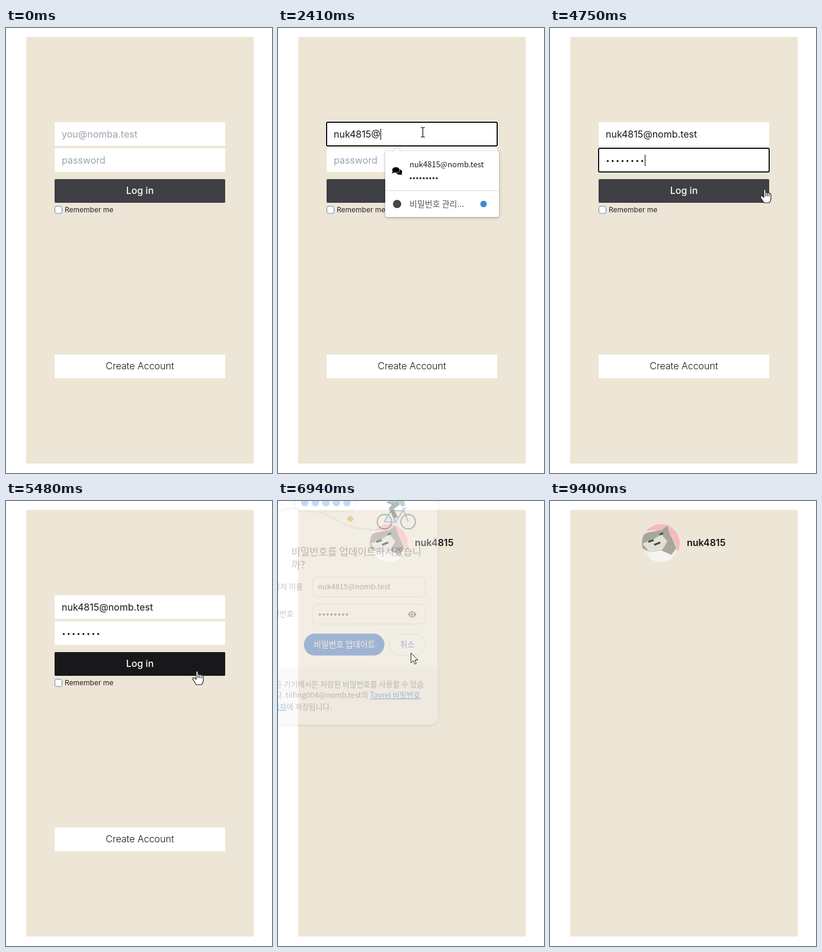
These frames come from a looping animation (449x751 px, 9.46 s). An HTML page:

```html
<!DOCTYPE html>
<html lang="en">
<head>
<meta charset="utf-8">
<title>Login flow</title>
<style>
html, body { margin: 0; width: 100%; height: 100%; overflow: hidden; background: #fff; }
svg { display: block; width: 449px; height: 751px; }
text { font: 400 16px Inter, sans-serif; fill: #18181b; white-space: pre; }
.mid { text-anchor: middle; }
.end { text-anchor: end; }
.hint { fill: #9ca3af; }
.ko text { font: 400 13px "Noto Sans CJK KR", "Noto Sans CJK", "Noto Sans CJK JP", sans-serif; fill: #55565a; }
.ko .title { font-size: 17.2px; }
.ko .btn { font-size: 14px; font-weight: 500; }
.link { fill: #0b57d0; text-decoration: underline; }
.dots { fill: none; stroke-linecap: round; }
#bubble { filter: drop-shadow(0 1px 2px rgba(0, 0, 0, .3)); }
#menu { filter: drop-shadow(0 1px 2px rgba(0, 0, 0, .35)); }
</style>
</head>
<body>
<svg viewBox="0 0 449 751">
  <rect x="34" y="15" width="384" height="720" fill="#ede6d6"/>

  <g id="login">
    <rect x="82" y="159" width="288" height="40" rx="2" fill="#fff"/>
    <rect x="82" y="203" width="288" height="40" rx="2" fill="#fff"/>
    <g id="ring" fill="#fff">
      <rect x="80" y="157" width="292" height="44" rx="4"/>
      <rect x="82" y="159" width="288" height="40" rx="2" stroke="#101010" stroke-width="2"/>
    </g>
    <text id="mailHint" class="hint" x="94" y="185">you@nomba.test</text>
    <text id="mail" x="94" y="185"></text>
    <text id="passHint" class="hint" x="94" y="229">password</text>
    <path id="pass" class="dots" stroke="#18181b" stroke-width="3.4" stroke-dasharray="0 8.3"/>
    <rect id="caret" width="1" height="19" fill="#000"/>
    <rect x="82" y="255" width="288" height="40" rx="2" fill="#3f3f46"/>
    <rect id="hover" x="82" y="255" width="288" height="40" rx="2" fill="#18181b"/>
    <text class="mid" x="226" y="280" style="fill:#fff;font-weight:500">Log in</text>
    <rect x="82.5" y="301" width="12" height="12" rx="2.5" fill="#fff" stroke="#5f89ab"/>
    <text x="99" y="311" style="font-size:12px;fill:#2b2027">Remember me</text>
    <rect x="82" y="551" width="288" height="40" fill="#fff"/>
    <text class="mid" x="226" y="576" style="font-weight:300">Create Account</text>

    <g id="menu" class="ko">
      <rect x="181" y="208" width="192" height="111" rx="4" fill="#fff"/>
      <path d="M195 208l6-6 6 6z" fill="#fff"/>
      <path d="M181 274.5h192" stroke="#d3dcea"/>
      <ellipse cx="204.500" cy="243" rx="5" ry="4.500"/>
      <ellipse cx="199" cy="239.500" rx="6.500" ry="5" stroke="#fff" stroke-width=".8"/>
      <path d="M194 241l-2 4.500 5-2zM208 244l1.500 4-5-1z"/>
      <text x="222" y="235" style="fill:#1f1f1f">nuk4815@nomb.test</text>
      <path class="dots" d="M224 253.500h45" stroke="#33282c" stroke-width="3.4" stroke-dasharray="0 5.5"/>
      <circle cx="201" cy="297" r="7" fill="#4c4146"/>
      <text x="222" y="302" style="font-size:14px">비밀번호 관리...</text>
      <circle cx="347" cy="297" r="5.500" fill="#3d87d6"/>
    </g>
  </g>

  <g id="home">
    <clipPath id="round"><circle cx="187" cy="71" r="32"/></clipPath>
    <g clip-path="url(#round)">
      <rect x="155" y="39" width="64" height="64" fill="#efece4"/>
      <path d="M165 39h54v50q-4-2-6-12-5-20-20-25-14-5-30-1z" fill="#f6b9c1"/>
      <path d="M155 58l10-5 24-4 9-8 4 15q7 10 11 24l-14 18-44-18z" fill="#a9a69a"/>
      <path d="M156 72l20-8 12-8 10 12-8 14-22 4z" fill="#e3e0d7"/>
      <path d="M165 87l22-4 18 8v12h-32z" fill="#f6f4ee"/>
      <path d="M166 69l9-3M185 57l6-3M176 74l10-4" stroke="#4a473f" stroke-width="3"/>
    </g>
    <text x="231" y="76" style="font-weight:600">nuk4815</text>

    <g id="bubble" class="ko">
      <rect x="-40" y="-53" width="313" height="435" rx="12" fill="#fff"/>
      <path d="M-40 283h313v87a12 12 0 0 1-12 12H-40z" fill="#f2f2f2"/>
      <path d="M-5 16C20 2 66 10 90 25s45 20 75 21" fill="none" stroke="#e1e3e6" stroke-width="3"/>
      <rect x="27" y="-25" width="104" height="40" rx="14" fill="#fff" stroke="#dfe2e6" stroke-width="2"/>
      <path class="dots" d="M43.500-1h74" stroke="#5a93ee" stroke-width="13" stroke-dasharray="0 18.2"/>
      <rect x="117.500" y="22.500" width="9" height="9" rx="1.500" fill="#dba63a" transform="rotate(38 122 27)"/>
      <g fill="none" stroke="#355a78" stroke-width="2">
        <circle cx="181" cy="32" r="12.500"/><circle cx="222" cy="32" r="12.500"/>
        <path d="M181 32l11-19h21l-13 20zM192 13l8 20M222 32l-9-23h6" stroke="#3f7fd9"/>
      </g>
      <path d="M183-2l23-4 1 9-10 7 7 14-6 2-10-17 6-6z" fill="#20364a"/>
      <path d="M190-14q16-4 24 6l3 12-6 2-5-8-14 2z" fill="#2f8a57"/>
      <text class="title" x="20" y="90">비밀번호를 업데이트하시겠습니</text>
      <text class="title" x="20" y="113">까?</text>
      <text class="end" x="40" y="149">사용자 이름</text>
      <text class="end" x="24" y="196">비밀번호</text>
      <g fill="none" stroke="#c9ccd0">
        <rect x="56.500" y="127.500" width="195" height="34" rx="8"/>
        <rect x="56.500" y="174.500" width="195" height="34" rx="8"/>
        <rect x="189.500" y="225.500" width="62" height="37" rx="18.500" stroke="#b3cdf5"/>
      </g>
      <text x="66" y="149">nuk4815@nomb.test</text>
      <path class="dots" d="M69.500 192h47.500" stroke="#474747" stroke-width="4" stroke-dasharray="0 6.7"/>
      <path d="M221.500 192q7.500-11 15 0-7.500 11-15 0z" fill="#474747"/>
      <circle cx="229" cy="192" r="2.700" fill="#474747" stroke="#fff" stroke-width="1.400"/>
      <rect x="42" y="225" width="139" height="38" rx="19" fill="#0b57d0"/>
      <text class="btn mid" x="112" y="249" style="fill:#fff">비밀번호 업데이트</text>
      <text class="btn mid" x="220.500" y="249" style="fill:#0b57d0">취소</text>
      <text class="end" x="249" y="317">모든 기기에서든 저장된 비밀번호를 사용할 수 있습</text>
      <text class="end" x="243" y="336">니다. tilfing004@nomb.test의 <tspan class="link">Tavrel 비밀번호</tspan></text>
      <text class="end" x="90" y="356"><tspan class="link">관리자</tspan>에 저장됩니다.</text>
    </g>
  </g>

  <circle id="click" r="12" fill="#ff0" fill-opacity=".47"/>
  <g id="cursor">
    <path id="arrow" transform="translate(-.5 -.5)" d="M0 0v16.500l3.900-3.600 2.600 5.900 2.500-1.100-2.600-5.700h5.100z" fill="#fff" stroke="#222"/>
    <g id="beam" fill="none" stroke="#000" stroke-width="1.100">
      <path id="bar" d="M-3-8h2.500l1 1 1-1H4M.5-7V7M-3 8h2.500l1-1 1 1H4" stroke="#fff" stroke-width="2.600"/>
      <path d="M-3-8h2.500l1 1 1-1H4M.5-7V7M-3 8h2.500l1-1 1 1H4"/>
    </g>
    <path id="hand" d="M-2 14V2q0-2 1.500-2T1 2v5q0-1.500 1.500-1.500T4 7.500q0-1.500 1.500-1.500T7 8q0-1 1.300-1T10 9v7q0 4-3 7H-2q-2-4-5-8-1.500-2.500 0-3.500t3 1zM1 7v5M4 8v4M7 9v3" fill="#fff" stroke="#222" stroke-width="1.200" stroke-linejoin="round"/>
  </g>
</svg>
<script>
const LOOP = 9460, TICK = 66.62, CLICK = 140;
const EMAIL = 'nuk4815@nomb.test';
const FOCUS = 680, TAB = 3410, SUBMIT = 5340, HOME = 5810, CANCEL = 6800;
const clicks = [FOCUS, SUBMIT, CANCEL, 8340, 9400];

// Pointer moves: start, end, target, vertical bend
const moves = [
  { from: 0, to: 610, x: 244, y: 176, bend: 0 },
  { from: 4480, to: 4880, x: 409, y: 310, bend: 0 },
  { from: 4880, to: 5280, x: 323, y: 287, bend: 0 },
  { from: 6210, to: 6740, x: 225, y: 257, bend: 0 },
  { from: 7205, to: 7670, x: 364, y: 174, bend: -155 },
  { from: 7810, to: 8010, x: 360, y: 177, bend: 24 },
  { from: 8670, to: 8870, x: 444, y: 762, bend: 0 }
];

const $ = id => document.getElementById(id);
const clamp = (v, lo, hi) => Math.min(hi, Math.max(lo, v));
const between = (t, a, b) => t >= a && t < b;
const ramp = (t, from, length) => clamp((t - from) / length, 0, 1);
const smooth = p => p * p * (3 - 2 * p);
const show = (id, on) => $(id).setAttribute('visibility', on ? 'inherit' : 'hidden');

// Steady typing: number of keys so far and the time of the latest one
function typing(t, first, gap, total) {
  const count = clamp(Math.floor((t - first) / gap) + 1, 0, total);
  return { count, at: count && first + (count - 1) * gap };
}

function pointer(t) {
  let x = 444, y = 775;
  for (const m of moves) {
    const p = smooth(ramp(t, m.from, m.to - m.from));
    x += (m.x - x) * p;
    y += (m.y - y) * p + 2 * p * (1 - p) * m.bend;
  }
  return [Math.round(x), Math.round(y)];
}

function drawFields(t) {
  const mail = typing(t, 1750, 91.25, EMAIL.length);
  const pass = typing(t, 3610, 134, 8);
  const onPass = t >= TAB;
  $('mail').textContent = EMAIL.slice(0, mail.count);
  show('mailHint', !mail.count);
  show('passHint', !pass.count);
  $('pass').setAttribute('d', pass.count ? `M97.5 224.5h${(pass.count - 1) * 8.3 + .1}` : '');

  const focused = between(t, FOCUS, SUBMIT);
  show('ring', focused);
  $('ring').setAttribute('transform', `translate(0 ${onPass ? 44 : 0})`);

  const idle = t - Math.max(onPass ? TAB : FOCUS + 70, mail.at, pass.at);
  const width = onPass ? pass.count * 8.3 : mail.count && $('mail').getComputedTextLength();
  show('caret', focused && idle % 1070 < 535);
  $('caret').setAttribute('x', Math.round(94 + width));
  $('caret').setAttribute('y', onPass ? 214 : 170);

  $('hover').setAttribute('opacity', ramp(t, 5000, 150));
  $('menu').setAttribute('opacity', ramp(t, FOCUS, 140) * (1 - ramp(t, TAB - 65, 240)) ** 2);
}

function drawBubble(t) {
  const alpha = ramp(t, HOME, 200) * (1 - ramp(t, CANCEL, 210));
  const scale = .955 + .067 * alpha;
  $('bubble').setAttribute('opacity', alpha);
  $('bubble').setAttribute('transform', `translate(120 166) scale(${scale}) translate(-120 -166)`);
}

function drawCursor(t, login) {
  const [x, y] = pointer(t);
  const inside = login && between(x, 82, 370);
  const beam = inside && (between(y, 159, 199) || between(y, 203, 243));
  const hand = inside && between(y, 255, 295);
  show('beam', beam);
  show('hand', hand);
  show('arrow', !beam && !hand);
  $('cursor').setAttribute('transform', `translate(${x} ${y})`);
  $('click').setAttribute('cx', x);
  $('click').setAttribute('cy', y);
}

function render(t) {
  const login = t < HOME;
  const tick = Math.max(0, Math.floor((t - 3) / TICK) * TICK + 10);
  show('login', login);
  show('home', !login);
  if (login) drawFields(t);
  else drawBubble(tick);
  drawCursor(tick, login);
  show('click', clicks.some(at => between(t, at, at + CLICK)));
}

const start = performance.now();
function loop() {
  render((performance.now() - start) % LOOP);
  requestAnimationFrame(loop);
}
loop();
</script>
</body>
</html>
```
